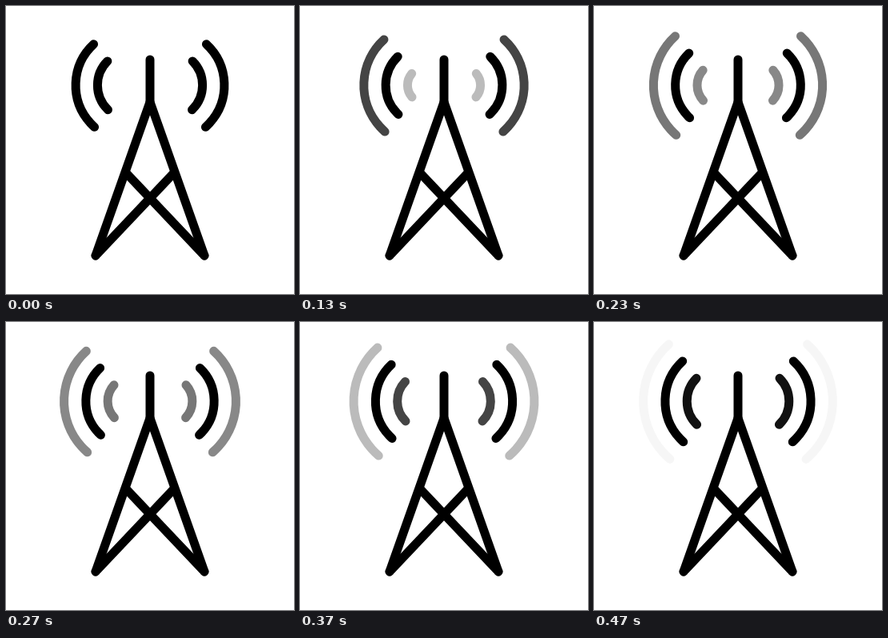
An HTML page with a canvas for the animation above (500 ms loop, 360 px wide and 360 px high).

```html
<!DOCTYPE html>
<html lang="en">
<head>
<meta charset="utf-8">
<title>Radio tower</title>
<style>
  html, body { margin: 0; height: 100%; overflow: hidden; background: #fff; }
  canvas { display: block; }
</style>
</head>
<body>
<canvas id="stage" width="360" height="360"></canvas>
<script>
const ctx = document.getElementById('stage').getContext('2d');
const LOOP = 500;
const STEPS = 15;
const AXIS = 180;

function strokePath(...points) {
  ctx.beginPath();
  points.forEach(([x, y]) => ctx.lineTo(x, y));
  ctx.stroke();
}

function drawTower() {
  strokePath([AXIS, 67], [AXIS, 120]);
  strokePath([112, 312], [AXIS, 120], [248, 312]);
  strokePath([112, 312], [210.5, 208]);
  strokePath([248, 312], [149.5, 208]);
}

// A mirrored pair of arcs; size grows by one for every ring outwards.
function drawWaves(size, alpha) {
  const radius = 15.3 + 27.3 * size;
  const spread = Math.asin((9 + 21.4 * size) / radius);
  const tilt = 0.01;
  ctx.globalAlpha = alpha;
  for (const side of [-1, 1]) {
    ctx.save();
    ctx.translate(AXIS, 99);
    ctx.scale(side, 1);
    ctx.beginPath();
    ctx.arc(23, 0, radius, -spread + tilt, spread + tilt);
    ctx.restore();
    ctx.stroke();
  }
  ctx.globalAlpha = 1;
}

// The faintest tones nearly vanish.
const fade = a => a < 0.1 ? a / 2 : a;

// Thirty steps a second, on a 10 ms clock.
function stepAt(time) {
  const rest = time % 100;
  return Math.floor(time / 100) * 3 + (rest >= 30) + (rest >= 70);
}

function draw(now) {
  const p = stepAt(now % LOOP) / STEPS;
  ctx.fillStyle = '#fff';
  ctx.fillRect(0, 0, 360, 360);
  ctx.strokeStyle = '#000';
  ctx.lineWidth = 11;
  ctx.lineCap = ctx.lineJoin = 'round';
  drawTower();
  drawWaves(p, fade(p));
  drawWaves(1 + p, 1);
  drawWaves(2 + p, fade(1 - p));
}

const start = performance.now();
function tick() {
  draw(performance.now() - start);
  requestAnimationFrame(tick);
}
tick();
</script>
</body>
</html>
```
